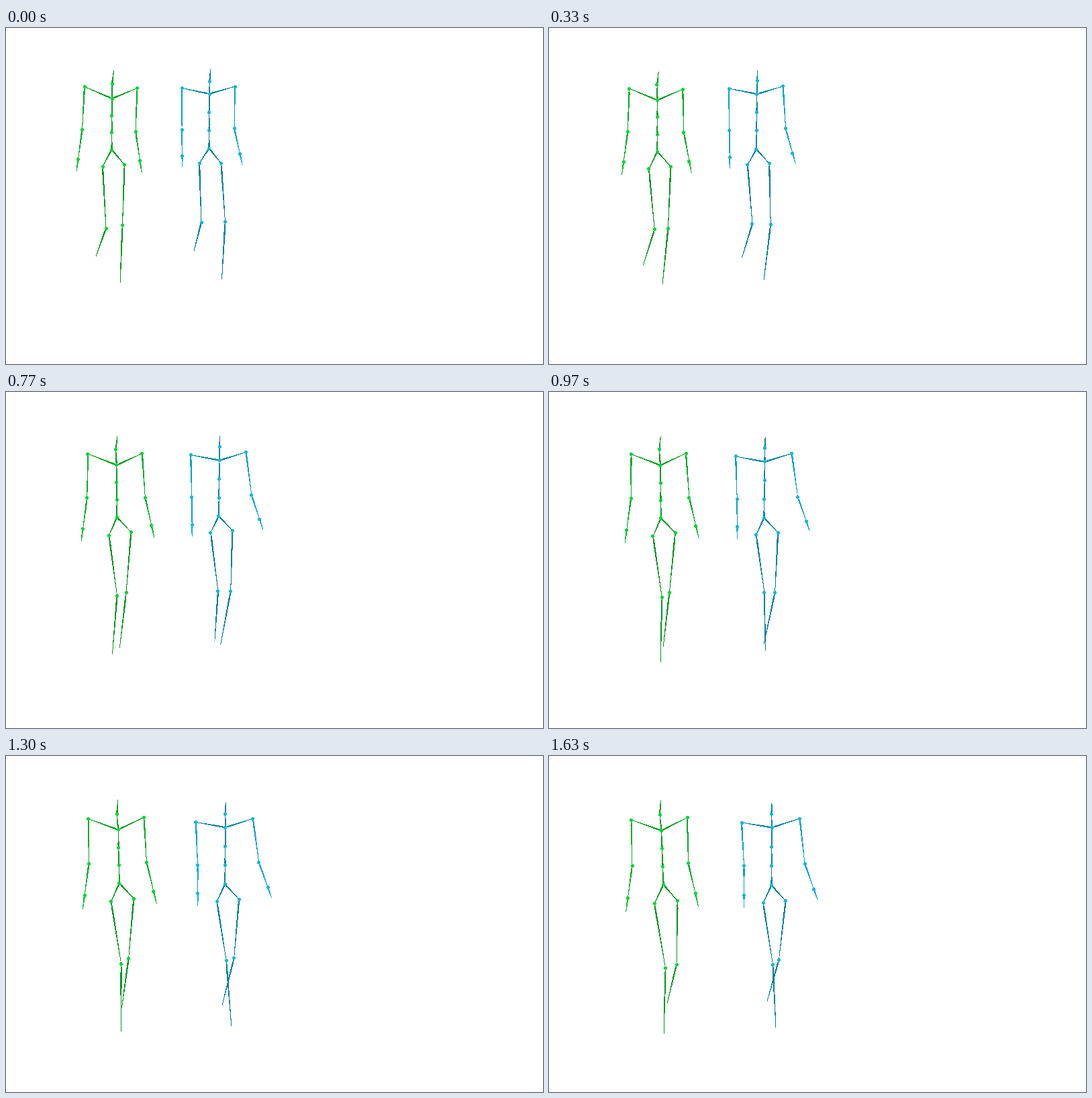
These frames come from a looping animation (800x500 px, 1660 ms). An HTML page with a canvas:

```html
<!DOCTYPE html>
<html lang="en">
<head>
<meta charset="utf-8">
<title>Two walking skeletons</title>
<style>
  html, body { margin: 0; width: 100%; height: 100%; overflow: hidden; background: #fff; }
  canvas { display: block; width: 800px; height: 500px; }
</style>
</head>
<body>
<canvas id="stage" width="800" height="500"></canvas>
<script>
const LOOP = 1660;
const LAST_STEP = 49;
const GROUND = [-.5, -.5];
const ctx = document.getElementById('stage').getContext('2d');

// Each side's limbs run from the trunk outwards.
const limbs = side => [
  ['chest', 'shoulder' + side, 'torso'],
  ['shoulder' + side, 'elbow' + side, 'arm'],
  ['elbow' + side, 'wrist' + side, 'arm'],
  ['wrist' + side, 'hand' + side, 'hand'],
  ['pelvis', 'hip' + side, 'leg'],
  ['hip' + side, 'knee' + side, 'leg'],
  ['knee' + side, 'ankle' + side, 'leg']
];
const BONES = [
  ...['chest neck', 'neck head', 'pelvis waist', 'waist spine', 'spine chest']
    .map(pair => [...pair.split(' '), 'torso']),
  ...limbs('L'), ...limbs('R')
];
const JOINTS = new Set(BONES.map(bone => bone[0]));

// How far each joint bows away from its straight path in mid-stride.
const ARC = {
  chest: [2, .4], pelvis: [-.7, -.4],
  elbowR: [5.2, -.5], wristR: [6.3, -2.6],
  hipL: [1.7, .5], hipR: [1.1, -1.2],
  kneeL: [5, -3], ankleR: [-3.5, 6.3]
};

// A path is: from, to, then optional arc and sway.
const green = {
  colors: { torso: '#009e20', arm: '#00ac24', hand: '#00be2a', leg: '#00961e', joint: '#00d636' },
  landing: .77,
  chest: [[158, 105], [167.5, 111], [2.4, .9], [0, .6]],
  pelvis: [[-.5, 76], [3, 80.5]],
  neck: [[0, -22], [-2.5, -24]],
  head: [[2.5, -41.5], [-1, -45]],
  arms: {
    L: { shoulder: [[-41, -17.5], [-45, -16]], elbow: [[-44.5, 46], [-43.5, 52]], wrist: [[-50.5, 90], [-50, 100]] },
    R: { shoulder: [[37.5, -15.5], [38.5, -19.5]], elbow: [[35, 49], [40, 48.5]], wrist: [[41.5, 92], [50.5, 93.5]] }
  },
  hips: { L: [[-13.5, 25], [-13.5, 28]], R: [[19, 22.5], [21, 24]] },
  legs: {
    L: { knee: [[149, 298], [173.5, 315.5]], ankle: [[134, 340], [171, 415]] },
    R: { knee: [[173.5, 293.5], [190, 310], [-2.7, -3], [2.4, 3.5]], ankle: [[170, 380], [176, 368]] }
  }
};

const blue = {
  colors: { torso: '#0086a0', arm: '#00a2c2', hand: '#0cacce', leg: '#007e98', joint: '#12b8d8' },
  landing: .9,
  chest: [[303, 98], [332, 106.5], [1.4, 0], [0, -1.5]],
  pelvis: [[-.5, 81], [-.5, 86]],
  neck: [[.5, -19], [-.5, -20.5]],
  head: [[1.5, -36.5], [0, -37.5]],
  arms: {
    L: { shoulder: [[-41, -8.5], [-45, -7.5]], elbow: [[-41, 53], [-41.5, 57]], wrist: [[-40.5, 92], [-41.5, 100.5]] },
    R: { shoulder: [[38, -11], [41.5, -13.5]], elbow: [[37, 51.5], [49, 53.5]], wrist: [[45.5, 89.5], [62.5, 91.5]] }
  },
  hips: { L: [[-14.5, 22.5], [-12.5, 26]], R: [[18, 22.5], [21, 23]] },
  legs: {
    L: { knee: [[291, 289], [333.5, 310.5]], ankle: [[280, 332], [338, 405]] },
    R: { knee: [[326.5, 288.5], [342.5, 303], [.7, 1]], ankle: [[321.5, 374], [325, 365]] }
  }
};

const lerp = (a, b, u) => a.map((v, i) => v + (b[i] - v) * u);
const smooth = u => u < 1 ? u * u * (3 - 2 * u) : 1;

function poseAt(figure, u) {
  const pose = {};
  const bow = 4 * u * (1 - u);
  const swing = Math.sin(2 * Math.PI * u);
  const place = (name, origin, [from, to, arc = ARC[name] || [0, 0], sway = [0, 0]]) => {
    pose[name] = lerp(from, to, u).map((v, i) => origin[i] + v + bow * arc[i] + swing * sway[i]);
  };

  place('chest', GROUND, figure.chest);
  for (const name of ['pelvis', 'neck', 'head']) place(name, pose.chest, figure[name]);
  pose.spine = lerp(pose.chest, pose.pelvis, 1 / 3);
  pose.waist = lerp(pose.chest, pose.pelvis, 2 / 3);

  for (const side of ['L', 'R']) {
    for (const [part, path] of Object.entries(figure.arms[side])) place(part + side, pose.chest, path);
    pose['hand' + side] = lerp(pose['elbow' + side], pose['wrist' + side], 1.43);
    place('hip' + side, pose.pelvis, figure.hips[side]);
    for (const [part, path] of Object.entries(figure.legs[side])) place(part + side, GROUND, path);
  }

  // The stepping foot eases forward and lands before the loop ends.
  const [lift, land] = figure.legs.L.ankle;
  pose.ankleL = lerp(lift, land, smooth(u / figure.landing)).map((v, i) => v + GROUND[i]);
  return pose;
}

// Hard-edged tapered bone: widest just after the parent joint.
function drawBone(from, to, color) {
  const steep = Math.abs(to[1] - from[1]) > Math.abs(to[0] - from[0]);
  const major = steep ? 1 : 0, minor = 1 - major;
  const length = to[major] - from[major];
  const slant = Math.hypot(to[0] - from[0], to[1] - from[1]) / Math.abs(length);
  const start = Math.ceil(Math.min(from[major], to[major]));
  const end = Math.floor(Math.max(from[major], to[major]));
  ctx.fillStyle = color;
  for (let p = start; p <= end; p++) {
    const s = (p - from[major]) / length;
    const half = slant * (s < .12 ? .6 + s * 5 : 1.2 - .88 * (s - .12));
    const center = from[minor] + (to[minor] - from[minor]) * s;
    const lo = Math.ceil(center - half);
    const size = Math.floor(center + half) - lo + 1;
    if (size < 1) continue;
    if (steep) ctx.fillRect(lo, p, size, 1);
    else ctx.fillRect(p, lo, 1, size);
  }
}

function drawJoint([x, y], color) {
  const cx = Math.round(x), cy = Math.round(y);
  ctx.fillStyle = color;
  ctx.fillRect(cx - 2, cy - 1, 5, 3);
  ctx.fillRect(cx - 1, cy - 2, 3, 5);
}

function drawFigure(figure, u) {
  const pose = poseAt(figure, u);
  for (const [from, to, part] of BONES) drawBone(pose[from], pose[to], figure.colors[part]);
  for (const name of JOINTS) drawJoint(pose[name], figure.colors.joint);
}

function render(now) {
  // 50 steps of 30 or 40 ms each, on a 10 ms clock.
  const clock = Math.floor((now % LOOP) / 10) * 10;
  const step = Math.floor((clock + 4) * 3 / 100);
  ctx.fillStyle = '#fff';
  ctx.fillRect(0, 0, 800, 500);
  for (const figure of [green, blue]) drawFigure(figure, step / LAST_STEP);
}

const began = performance.now();
function tick() {
  render(performance.now() - began);
  requestAnimationFrame(tick);
}
tick();
</script>
</body>
</html>
```
